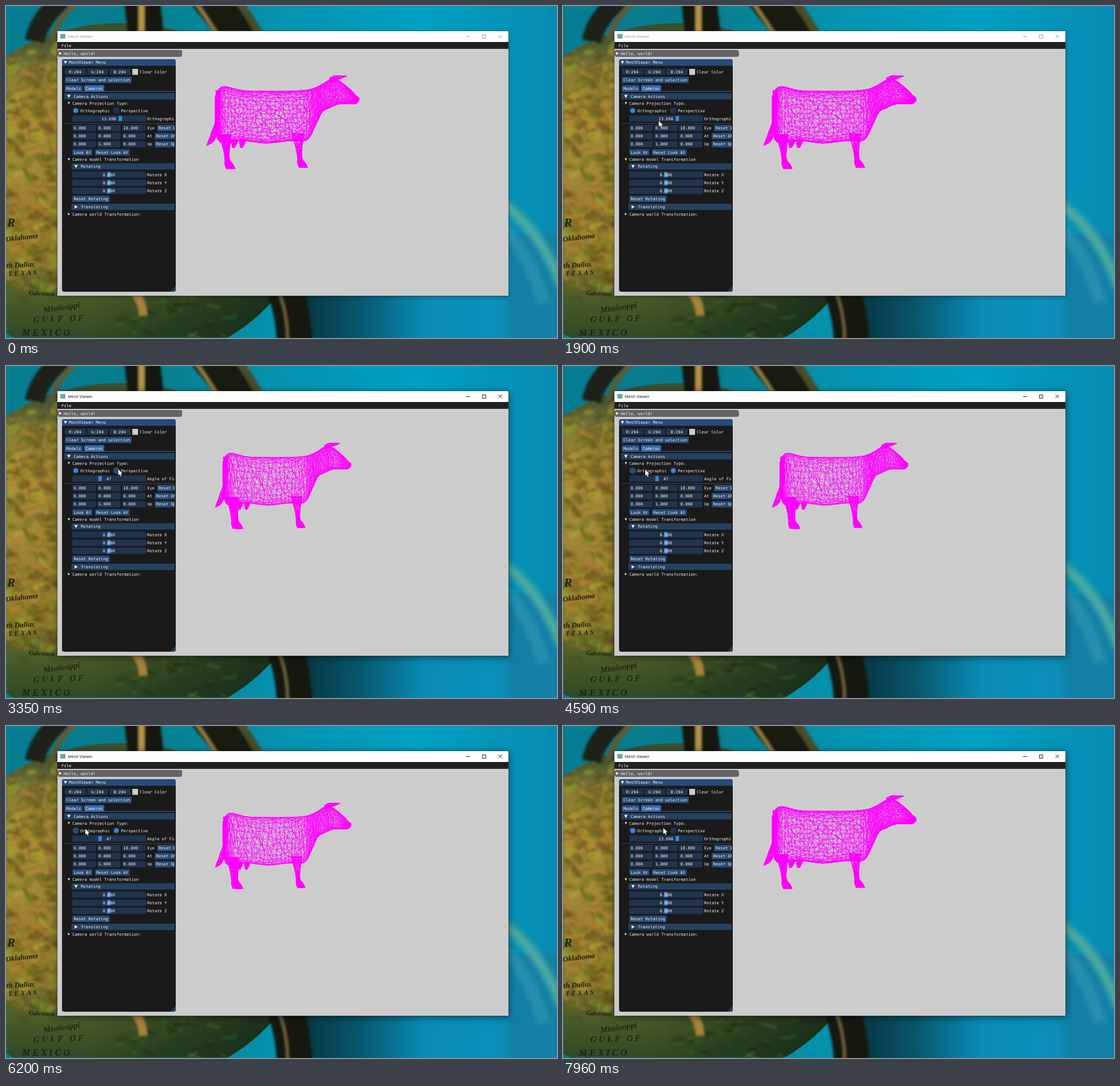
Recreate the animation shown at these times as an HTML page with a canvas. Size 964 by 581 pixels, loop 8 s.

```html
<!DOCTYPE html>
<html lang="en">
<head>
<meta charset="utf-8">
<title>Mesh Viewer</title>
<style>
html, body { margin: 0; width: 100%; height: 100%; overflow: hidden; background: #0a6a80; }
canvas { display: block; }
</style>
</head>
<body>
<canvas id="stage" width="964" height="581"></canvas>
<script>
const W = 964, H = 581, LOOP = 8000;
const CHAR = 4.3;
const MONO = '7.15px "DejaVu Sans Mono", monospace';
const view = document.getElementById('stage').getContext('2d');
let g = view;

let seed = 7;
const random = () => (seed = seed * 16807 % 2147483647) / 2147483647;
const between = (a, b) => a + (b - a) * random();
const mix = (a, b, f) => a + (b - a) * f;
const smooth = f => f * f * (3 - 2 * f);

function layer(draw) {
  const c = document.createElement('canvas');
  c.width = W; c.height = H;
  g = c.getContext('2d');
  draw();
  g = view;
  return c;
}

function rect(x, y, x2, y2, color, r = 0) {
  g.fillStyle = color;
  g.beginPath();
  g.roundRect(x, y, x2 - x, y2 - y, r);
  g.fill();
}

function fill(d, color) {
  g.fillStyle = color;
  g.fill(new Path2D(d));
}

function line(d, color, width = 1) {
  g.strokeStyle = color;
  g.lineWidth = width;
  g.stroke(new Path2D(d));
}

function text(s, x, y, { color = '#f2f2f2', font = MONO, align = 'left' } = {}) {
  g.font = font;
  g.fillStyle = color;
  g.textAlign = align;
  g.fillText(s, x, y + 2.5);
}

function gradient(x, y, x2, y2, ...colors) {
  const f = g.createLinearGradient(x, y, x2, y2);
  colors.forEach((c, i) => f.addColorStop(i / (colors.length - 1), c));
  return f;
}

// ---- desktop picture ----
function globe() {
  g.save();
  g.beginPath();
  g.ellipse(200, 330, 340, 300, 0, 0, 7);
  g.clip();
  rect(0, 0, W, H, gradient(0, 50, 0, H, '#3c5030', '#8c7d33', '#ad8a35', '#a5893a', '#a07f33', '#a1832f', '#4f5c28', '#2f4a26'));
  for (let i = 0; i < 260; i++) {
    const x = between(-10, 100), y = between(60, 500), r = between(3, 16);
    g.fillStyle = `hsla(${between(36, 72)},55%,${between(18, 50)}%,.45)`;
    g.beginPath();
    g.ellipse(x, y, r, r * .5, between(-1, 1), 0, 7);
    g.fill();
  }
  for (let i = 0; i < 130; i++) {
    const x = between(-10, 90), y = between(90, 510);
    line(`M${x} ${y}l${between(4, 22)} ${between(-8, 8)}l${between(-6, 12)} ${between(-14, 14)}`,
      i % 4 ? 'rgba(45,40,15,.6)' : 'rgba(130,55,25,.6)', 1.2);
  }
  rect(0, 500, W, H, gradient(150, 0, 440, 0, 'rgba(14,36,24,0)', 'rgba(14,36,24,.75)'));
  for (let i = 0; i < 50; i++) {
    const x = between(180, 400);
    line(`M${x} ${between(505, 580)}l${between(8, 30)} ${between(-8, 8)}`, `hsla(${between(60, 110)},45%,${between(8, 30)}%,.6)`, 4);
  }
  line('M224 500Q240 520 240 542', '#a8843a', 15);
  g.restore();
}

function label(s, x, y, size, turn = 0) {
  g.save();
  g.translate(x, y);
  g.rotate(turn);
  text(s, 0, 0, { color: '#1c2512', font: `italic bold ${size}px "Liberation Serif", serif` });
  g.restore();
}

function desktop() {
  rect(0, 0, W, H, gradient(0, 0, W, 0, '#067d93', '#087c8c', '#0593af', '#00a0c4', '#088bb0'));
  g.filter = 'blur(2px)';
  rect(500, 500, 990, 610, gradient(500, 0, W, 0, '#06303a', '#07566b', '#0a8bb5', '#0b8fba', '#15789c'));
  rect(879, 400, 990, 610, '#1280a6');
  globe();

  // wheel rim, chain and stand
  line('M50 62Q58 20 100 -10', '#1d2119', 34);
  line('M80 62Q88 20 130 -10', '#5d5b38', 10);
  line('M238 -10L246 60', '#14160f', 62);
  line('M237 -10V60', '#b59449', 12);
  line('M350 -20Q380 18 420 60', '#191a10', 62);
  line('M322 -20Q350 18 376 60', '#8d793f', 8);
  line('M400 -20Q425 18 450 60', '#4b4c28', 14);
  line('M485 490Q505 540 505 600', '#14180f', 62);
  line('M474 490Q496 545 492 600', '#73623b', 6);

  // pale ring at the right
  g.filter = 'blur(5px)';
  line('M868 346Q934 390 972 490', '#4aa9a2', 18);
  line('M850 380Q910 410 940 520', 'rgba(60,160,180,.5)', 22);
  g.filter = 'none';

  label('R', 2, 383, 21);
  label('Oklahoma', 0, 410, 13, -.12);
  label('North Dallas', -20, 457, 13, -.05);
  label('T E X A S', 4, 470, 12, -.05);
  label('Galveston', 40, 503, 11, .05);
  label('Mississippi', 66, 534, 14, -.14);
  label('G U L F   O F', 48, 551, 15, -.03);
  label('M E X I C O', 28, 574, 16);
}

// ---- wireframe model: tubes given by [position, low side, high side] ----
const torso = [
  [366, 160, 208], [371, 147, 234], [383, 141, 240], [415, 148, 236], [455, 149, 240], [495, 149, 236],
  [526, 147, 235], [541, 143, 210], [553, 137, 186], [567, 129, 178], [581, 130, 172], [600, 144, 171],
  [612, 156, 171], [618, 161, 165]];
const leg = [[225, 373, 394], [250, 380, 391], [268, 383, 391], [277, 383, 397], [285, 386, 401]];
const tail = [[148, 367, 375], [190, 369, 374], [220, 360, 369], [236, 354, 364], [244, 351, 352]];
const teat = [[234, 394, 406], [240, 395, 404], [248, 396, 400]];
const horn = [[566, 126, 134], [575, 122, 130], [585, 122, 127], [596, 122, 123]];

function spline(keys, u) {
  const i = Math.min(Math.floor(u), keys.length - 2), f = u - i;
  const key = k => keys[Math.max(0, Math.min(keys.length - 1, k))];
  const [a, b, c, d] = [-1, 0, 1, 2].map(k => key(i + k));
  return b.map((p, k) => p + f * ((c[k] - a[k]) / 2
    + f * (a[k] - 2.5 * p + 2 * c[k] - d[k] / 2
    + f * (1.5 * (p - c[k]) + (d[k] - a[k]) / 2))));
}

function tube(keys, upright, rings, rows) {
  const last = (keys.length - 1) * rings;
  const point = (i, j) => {
    const inner = j > 0 && j < rows;
    const u = i > 0 && i < last ? i + (inner ? between(-.4, .4) : 0) : i;
    const [s, low, high] = spline(keys, u / rings);
    const turn = (j + (inner ? between(-.4, .4) : 0)) / rows * Math.PI;
    const across = mix(low, high, (1 - Math.cos(turn)) / 2);
    return upright ? [across, s] : [s, across];
  };
  g.beginPath();
  for (let side = 0; side < 2; side++) {
    const grid = Array.from({ length: last + 1 }, (_, i) => Array.from({ length: rows + 1 }, (_, j) => point(i, j)));
    const edge = (a, b) => { g.moveTo(...a); g.lineTo(...b); };
    for (let i = 0; i < last; i++) for (let j = 0; j <= rows; j++) {
      edge(grid[i][j], grid[i + 1][j]);
      if (j === rows) continue;
      edge(grid[i][j], grid[i][j + 1]);
      if (random() < .6) edge(grid[i][j], grid[i + 1][j + 1]);
      else edge(grid[i + 1][j], grid[i][j + 1]);
    }
  }
  g.stroke();
}

function shifted(dx, dy, draw) {
  g.save();
  g.translate(dx, dy);
  draw();
  g.restore();
}

function cow(rows, legGap) {
  g.strokeStyle = '#f0f';
  g.lineWidth = .75;
  tube(torso, false, 5, rows);
  g.lineWidth = 1.1;
  tube(tail, true, 5, 4);
  tube(horn, false, 4, 3);
  for (const dx of [0, 14]) shifted(dx, 0, () => tube(teat, true, 4, 4));
  for (const dx of [0, legGap]) shifted(dx, 0, () => tube(leg, true, 5, 5));
  shifted(127, -2, () => tube(leg, true, 5, 5));
}

function distantCow() {
  g.translate(366, 285);
  g.scale(.89, .92);
  g.translate(-351, -285);
  cow(13, 5);
}

// ---- window ----
const FRAME = '#21344f', BUTTON = '#284b76', HEADER = '#26415f', HOVER = '#2a4c74', ACTIVE = '#356db0';
const CENTER = { align: 'center' };

function arrow(x, y, s, open = true) {
  fill(open ? `M${x - s} ${y - s * .8}h${2 * s}L${x} ${y + s}Z`
            : `M${x - s * .8} ${y - s}v${2 * s}L${x + s} ${y}Z`, '#f2f2f2');
}

function field(x, width, y) {
  rect(x, y - 5.5, x + width, y + 5.5, FRAME);
}

function button(s, x, y, color = BUTTON, r = 0) {
  rect(x, y - 5.5, x + s.length * CHAR + 5, y + 5.5, color, r);
  text(s, x + 2.5, y);
}

function header(s, x, y, open) {
  rect(x, y - 5.5, 295, y + 5.5, HEADER);
  arrow(x + 8, y, 3, open);
  text(s, x + 16.5, y);
}

function tree(s, y, open) {
  arrow(110, y, 2.1, open);
  text(s, 116, y);
}

function slider(value, name, y, grab, color) {
  field(116, 129, y);
  rect(grab - 3, y - 4.5, grab + 3, y + 4.5, color);
  text(value, 180, y, CENTER);
  text(name, 247, y);
}

function radio(s, x, color, dot) {
  for (const [r, c] of [[5.6, color], [3.9, dot || color]]) {
    g.fillStyle = c;
    g.beginPath();
    g.arc(x, 183, r, 0, 7);
    g.fill();
  }
  text(s, x + 8, 183);
}

function shell(focused) {
  g.save();
  g.shadowColor = focused ? 'rgba(0,0,0,.5)' : 'rgba(0,0,0,.3)';
  g.shadowBlur = focused ? 12 : 7;
  g.shadowOffsetY = 2;
  rect(89.5, 43.5, 879.5, 507.5, '#3c4144');
  g.restore();
  rect(90, 44, 879, 63, '#fff');
  rect(90, 63, 879, 75, '#202024');
  rect(90, 75, 879, 507, '#ccc');
  rect(95, 49, 104, 57, '#6fa896');
  const color = focused ? '#111' : '#999';
  text('Mesh Viewer', 108, 53.5, { color, font: '7.3px "Open Sans", sans-serif' });
  line('M805 53.5h7M833.5 50.5h6v6h-6zM861.5 50l6.5 6.5m0 -6.5l-6.5 6.5', color, .9);
  text('File', 97, 69);
  rect(90, 77, 308, 89, '#656365', 4);
  arrow(95, 83, 2.8, false);
  text('Hello, world!', 101, 83);
}

function panel(t, x, y) {
  const within = (a, b) => t >= a && t < b;
  const focused = t >= 2740;
  const accent = focused ? '#3d85e0' : '#2894d2';
  const state = (left, right, pressed) => {
    if (!focused || x < left || x > right || y < 174 || y > 189) return FRAME;
    return pressed ? ACTIVE : HOVER;
  };
  g.save();
  g.beginPath();
  g.roundRect(98, 93, 199, 407, 4);
  g.clip();
  rect(98, 93, 297, 500, '#1a1a1a');
  rect(98, 93, 297, 104.5, '#294a7a');
  arrow(104, 98.5, 2.9);
  text('MeshViewer Menu', 110, 98.5);
  fill('M297 490v10h-10Z', '#23405f');
  g.beginPath();
  g.rect(98, 93, 197, 407);
  g.clip();

  ['R', 'G', 'B'].forEach((c, i) => {
    field(103 + i * 39, 37, 115);
    text(c + ':204', 121 + i * 39, 115, CENTER);
  });
  rect(221, 110, 231, 120.5, '#ccc');
  text('Clear Color', 234, 115);
  button('Clear Screen and selection', 103, 129.5);
  button('Models', 103, 144, '#2b5083', 2);
  button('Cameras', 136.7, 144, '#3369ad', 2);
  rect(103, 149, 295, 150, '#3369ad');

  header('Camera Actions', 102, 158, true);
  tree('Camera Projection Type:', 170, true);
  radio('Orthographic', 122, state(116, 183, within(7060, 7340)), !within(3570, 7620) && accent);
  radio('Perspective', 193, state(187, 249, within(3040, 3350)), within(3570, 7340) && accent);
  if (within(3350, 7340)) slider('47', 'Angle of Field', 197, 164.5, accent);
  else slider('13.690', 'Orthographic', 197, 200, t >= 2510 ? '#3d85e0' : accent);
  rect(103, 205, 295, 206, '#45454d');

  ['Eye', 'At', 'Up'].forEach((name, i) => {
    const row = 213.5 + i * 14.2;
    [0, name === 'Up' ? 1 : 0, name === 'Eye' ? 10 : 0].forEach((v, k) => {
      field(116 + k * 43.5, 41, row);
      text(v.toFixed(3), 118.3 + k * 43.5, row);
    });
    text(name, 247, row);
    button('Reset ' + name, 251.6 + name.length * CHAR, row);
  });
  button('Look At', 116, 256);
  button('Reset Look At', 155.5, 256);

  tree('Camera model Transformation', 268.3, true);
  header('Rotating', 114.5, 280.7, true);
  ['X', 'Y', 'Z'].forEach((axis, i) => slider('0.000', 'Rotate ' + axis, 295 + i * 14.2, 180, accent));
  button('Reset Rotating', 116, 337.5);
  header('Translating', 114.5, 351.5, false);
  tree('Camera world Transformation:', 364, false);
  g.restore();
}

// ---- pointer moves: start, end, x, y ----
const moves = [
  [810, 1230, 138.5, 221], [1560, 2240, 196.5, 181], [4090, 4880, 121, 182], [5050, 5620, 168, 185],
  [5900, 6400, 123, 177], [6400, 6600, 130.5, 181.5], [7740, 7960, 175.5, 178.5]];

function pointerAt(t) {
  let x = 290, y = 568;
  for (const [start, end, toX, toY] of moves) {
    const f = smooth(Math.max(0, Math.min(1, (t - start) / (end - start))));
    x = mix(x, toX, f);
    y = mix(y, toY, f);
  }
  return [x, y];
}

function pointer(x, y) {
  g.save();
  g.translate(x, y);
  const shape = 'M0 0V10.4L2.4 8.2L4 12L5.7 11.3L4.1 7.6H7.4Z';
  line(shape, '#111', .9);
  fill(shape, '#fff');
  g.restore();
}

const back = layer(desktop);
const flat = layer(() => cow(17, 0)), deep = layer(distantCow);

function frame(t) {
  const [x, y] = pointerAt(t);
  g.drawImage(back, 0, 0);
  shell(t >= 2740);
  g.drawImage(t >= 3350 && t < 7340 ? deep : flat, 0, 0);
  panel(t, x, y);
  if (t >= 810) pointer(x, y);
}

const start = performance.now();
function tick() {
  frame((performance.now() - start) % LOOP);
  requestAnimationFrame(tick);
}
tick();
</script>
</body>
</html>
```
